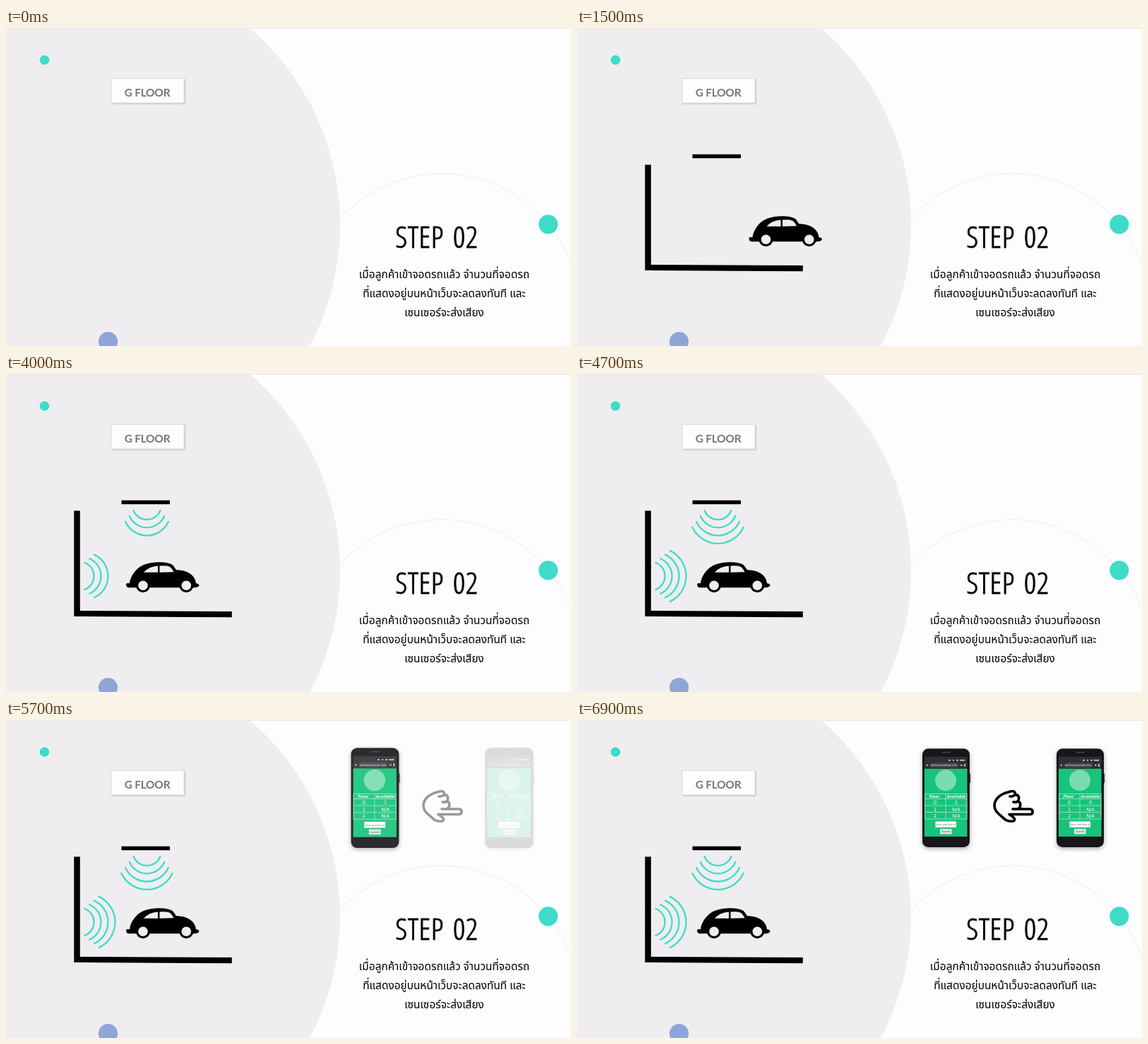
An HTML page for the animation above (7100 ms loop, 800 by 450 pixels).

```html
<!DOCTYPE html>
<html lang="th">
<head>
<meta charset="utf-8">
<title>Step 02</title>
<style>
  html, body { margin: 0; width: 100%; height: 100%; overflow: hidden; background: #fdfcfe; }
  svg { display: block; width: 100%; height: 100%; }
  .mid { text-anchor: middle; }
  .label { font: 700 15.5px Lato, sans-serif; fill: #777; letter-spacing: -.25px; }
  .title { font: 400 43px 'Open Sans Condensed Light', 'Open Sans Condensed', 'Open Sans', sans-serif; font-stretch: 75%; letter-spacing: .7px; word-spacing: 4px; stroke: #000; stroke-width: .9; }
  .thai { font: 500 15.4px 'Noto Sans Thai', 'Noto Sans', sans-serif; }
  .card { filter: drop-shadow(1px 1.5px 1.2px #0003); }
  .phone { filter: drop-shadow(0 2px 3px #0005); }
  .phone text { font: 6.6px 'DejaVu Sans', sans-serif; fill: #fff; }
  .phone .head { font-size: 5.2px; font-weight: 700; font-style: italic; }
  .phone .tiny { font-size: 3.4px; }
  .phone .note { font-size: 3px; }
  .phone .dark { fill: #444; }
  .line { fill: none; stroke: #3edcc8; stroke-width: 2.3; stroke-linecap: round; }
</style>
</head>
<body>
<svg viewBox="0 0 800 450">
  <circle cx="617" cy="401" r="195" fill="none" stroke="#f3f2f4" stroke-width="1.6"/>
  <circle cx="107" cy="278" r="366" fill="#efedef"/>
  <rect width="800" height="1" fill="#e6e5e7"/>
  <circle cx="54.5" cy="45.3" r="6.8" fill="#3edcc8"/>
  <circle cx="767.8" cy="277.8" r="13.6" fill="#3edcc8"/>
  <circle cx="144.5" cy="443.5" r="13.6" fill="#8fa5d6"/>
  <rect class="card" x="149" y="71.5" width="103" height="34.5" fill="#fdfcfe" stroke="#d9d9dc" stroke-width=".8"/>
  <text class="mid label" x="200" y="97">G FLOOR</text>
  <text class="mid title" x="610" y="311">STEP 02</text>
  <g class="mid thai">
    <text x="620.5" y="354">เมื่อลูกค้าเข้าจอดรถแล้ว จำนวนที่จอดรถ</text>
    <text x="620.5" y="381">ที่แสดงอยู่บนหน้าเว็บจะลดลงทันที และ</text>
    <text x="620.5" y="408">เซนเซอร์จะส่งเสียง</text>
  </g>

  <path id="walls" d="M96.3 193.5h8.500v141.500l215 1v8.300L96.300 343ZM163.500 178.700h68.500v5.600h-68.500Z"/>

  <g id="car">
    <path d="M0 31Q1 29 5 30C6 19 15 7 27 3Q36 0 47 0Q60 0 66 4Q69 8 71 11C86 11 98 18 99 30Q103 30 103.500 33Q102 36 97 36H4Q0 36 0 31Z"/>
    <path fill="#efedef" d="M25 14.5Q32 6 45 5.2V14.5ZM47.500 5.200Q57 4.500 62 6.500Q66 10 67.500 14L47.500 14.500Z"/>
    <g fill="#efedef" stroke="#000" stroke-width="3.2">
      <circle cx="24" cy="33" r="8.4"/>
      <circle cx="85.300" cy="33" r="8.4"/>
    </g>
  </g>

  <g id="waves"></g>
  <g id="phones"></g>

  <path id="hand" fill="none" stroke="#000" stroke-width="3.6" stroke-linecap="round" stroke-linejoin="round"
    d="M620 106C622 100 616 100 611 102C598 105 591 113 591 121C591 130 599 134 604 139C608 143.500 614 143.500 618 143C622 141 618 137 612 133.500H642A3.800 3.800 0 0 0 642 126H617M620 106C626 105 627 111 624 115C629 116 629 124 624 126M613 108Q617 109 620 106M618 116Q622 117 624 115"/>
</svg>

<script>
const LOOP = 7100, STEP = 100;
const $ = id => document.getElementById(id);
const ramp = (t, from, to) => Math.min(1, Math.max(0, (t - from) / (to - from)));

// One sound wave per sensor: arcs given by half chord h and sag.
function wave(i) {
  const h = 19 + 5.7 * i, sag = 13 + 3.3 * i;
  const r = (h * h + sag * sag) / (2 * sag);
  const y = 206 + 11.3 * i - sag, x = 124.5 + 10 * i - sag;
  return `<path class="line" d="M${199.5 - h} ${y}A${r} ${r} 0 0 0 ${199.5 + h} ${y}
    M${x} ${286 - h}A${r} ${r} 0 0 1 ${x} ${286 + h}"/>`;
}

function phone(dx, free) {
  const cell = (x, y, text, cls = '') => `<text class="mid ${cls}" x="${x}" y="${y}">${text}</text>`;
  const rows = [['G', free], ['1', 'N/A'], ['2', 'N/A']];
  return `<g><g class="phone" transform="translate(${dx})">
    <rect x="555" y="76" width="2" height="13" fill="#333"/>
    <rect x="489" y="40.5" width="67" height="139.5" rx="8.5" fill="#17171a"/>
    <rect x="516" y="45" width="13" height="1.6" rx=".8" fill="#444"/>
    <rect x="492" y="52" width="60.5" height="17" fill="#303034"/>
    <rect x="500" y="60.5" width="40" height="7" rx="3.5" fill="#45454a"/>
    <path d="M526 57h3m3 0h2m3 0h3m2 0h7M494.5 64h2.5M543 64h2.5M549 62v4" stroke="#ddd" stroke-width="1.5"/>
    ${cell(519.5, 65.3, 'parking.example.com', 'tiny')}
    <rect x="492" y="69" width="60.5" height="96" fill="#16c47a"/>
    <circle cx="522" cy="85.5" r="15" fill="#79dcb0"/>
    <path d="M492.5 104.5h59.5v35.5h-59.5ZM492.5 111.5h59.5M492.5 121h59.5M492.5 130.5h59.5M522 104.5v35.5" fill="none" stroke="#a5ebcd" stroke-width=".8"/>
    ${cell(506, 110, 'Floor', 'head')}${cell(537, 110, 'Available', 'head')}
    ${rows.map(([floor, n], i) => cell(507, 119 + i * 9.5, floor) + cell(537, 119 + i * 9.5, n)).join('')}
    <rect x="507.5" y="143.5" width="29.5" height="8.5" fill="#fff"/>
    ${cell(522.2, 149, 'Enter your floor id', 'note dark')}
    <rect x="514" y="154" width="16.5" height="7.5" fill="#e4e4e4"/>
    ${cell(522.2, 159, 'Submit', 'tiny dark')}
  </g></g>`;
}

$('waves').innerHTML = [0, 1, 2, 3].map(wave).join('');
$('phones').innerHTML = phone(0, 1) + phone(190, 0);
const waves = [...$('waves').children];
const phones = [...$('phones').children];

function showPhone(el, p, cx) {
  const scale = 1 + 0.045 * Math.sin(Math.PI * p);
  el.setAttribute('opacity', p);
  el.setAttribute('transform', `translate(${cx} 110) scale(${scale}) translate(${-cx} -110)`);
}

function draw(now) {
  const t = Math.floor(now % LOOP / STEP) * STEP;
  $('walls').setAttribute('opacity', ramp(t, 0, 600));
  $('car').setAttribute('opacity', t >= 1000 ? 1 : 0);
  $('car').setAttribute('transform', `translate(${317 - 147 * ramp(t, 1000, 2000)} 266.3)`);
  waves.forEach((el, i) => el.setAttribute('opacity', ramp(t, 2500 + 500 * i, 3000 + 500 * i)));
  showPhone(phones[0], ramp(t, 4750, 5800), 522.5);
  $('hand').setAttribute('opacity', ramp(t, 5500, 6000));
  showPhone(phones[1], ramp(t, 5550, 6600), 712.5);
}

const start = performance.now();
function tick() {
  draw(performance.now() - start);
  requestAnimationFrame(tick);
}
tick();
</script>
</body>
</html>
```
